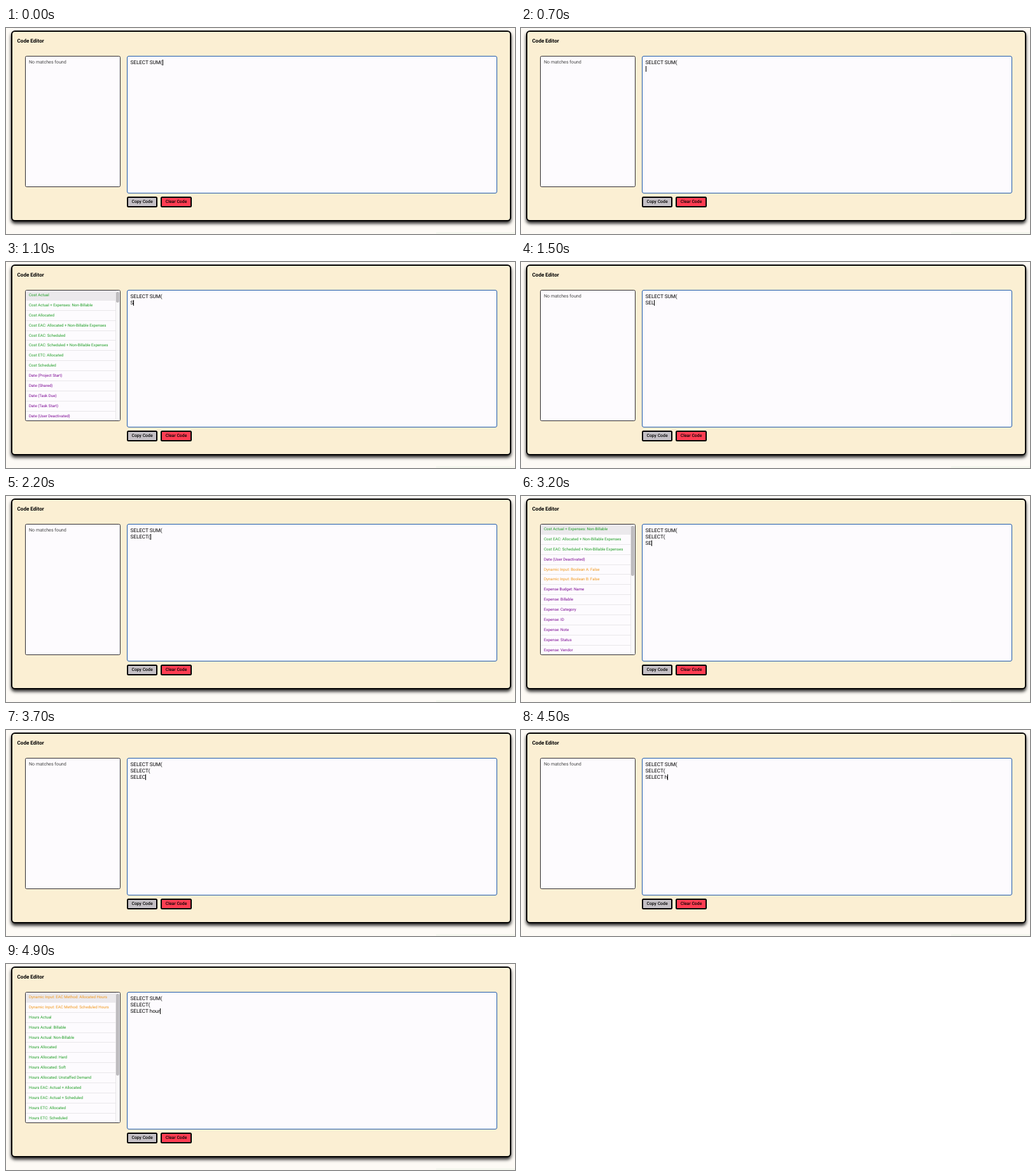
Write an HTML page that moves like this. It is 800 px wide and 325 px high and loops after 5000 ms.

```html
<!DOCTYPE html>
<html lang="en">
<head>
<meta charset="utf-8">
<title>Code Editor</title>
<style>
  * { box-sizing: border-box; }
  html, body { margin: 0; width: 100%; height: 100%; overflow: hidden; background: #fdfaf5; }
  body { position: relative; font-family: Roboto, sans-serif; color: #000; text-rendering: geometricPrecision; }
  body div { position: absolute; white-space: pre; }
  .card {
    left: 8px; top: 4px; width: 786px; height: 300.5px;
    border: 2px solid #000; border-radius: 6px;
    background: #fbefd3; box-shadow: 0 3.5px 5px rgba(0, 0, 0, .85);
  }
  .tint { left: 676px; top: 322px; width: 124px; height: 3px; background: #f5f7ee; }
  .title { left: 17.5px; top: 14px; line-height: 12px; font-size: 8.1px; font-weight: 700; }
  .panel {
    left: 30px; top: 44px; width: 150px; height: 207px; overflow: hidden;
    border: 1px solid #2e2c30; border-radius: 2.5px; background: #fdfbfe;
  }
  .empty { left: 5px; top: 3.5px; font-size: 7.15px; line-height: 10px; color: #444; }
  .list { inset: 0; }
  .list .row {
    left: 0; width: 141px; height: 15.88px; padding-left: 5px;
    font-size: 6.15px; line-height: 15.6px; border-bottom: .8px solid #e9e7ea;
  }
  .list .row:first-child { background: #ebe9ec; }
  .track { right: 0; top: 0; width: 7.5px; height: 100%; background: #faf9fa; border-left: 1px solid #e8e6e8; }
  .thumb { left: .8px; top: 2px; width: 4.6px; border-radius: 2.3px; background: #bdbbbe; }
  .code {
    left: 189.5px; top: 44.3px; width: 582px; height: 217px;
    border: 1.5px solid #1c58a8; border-radius: 3px; background: #fdfbfe;
  }
  .text { left: 195.5px; top: 50.3px; font-size: 8.1px; line-height: 9.75px; }
  .text i { display: inline-block; width: .8px; height: 9px; margin-right: -1px; vertical-align: -2px; background: #000; }
  .btn {
    top: 266px; height: 17.2px; border: 2px solid #000; border-radius: 2.5px;
    font-size: 6.85px; font-weight: 500; line-height: 13.2px; text-align: center;
  }
  .copy { left: 190px; width: 48px; background: #c4c0c5; }
  .clear { left: 243px; width: 49px; background: #ff3d52; }
</style>
</head>
<body>
<div class="tint"></div>
<div class="card"></div>
<div class="title">Code Editor</div>
<div class="panel" id="panel"><div class="empty" id="empty">No matches found</div></div>
<div class="code"></div>
<div class="text"><span id="typed"></span><i></i></div>
<div class="btn copy">Copy Code</div>
<div class="btn clear">Clear Code</div>
<script>
const LOOP = 5000, ROW = 15.88;
const GREEN = '#209f26', PURPLE = '#7d0894', ORANGE = '#f0961a';
const colorOf = s => /^(Cost|Hours)/.test(s) ? GREEN : /^Dynamic/.test(s) ? ORANGE : PURPLE;

const lists = {
  s: [17, `Cost Actual|Cost Actual + Expenses: Non-Billable|Cost Allocated|Cost EAC: Allocated + Non-Billable Expenses|Cost EAC: Scheduled|Cost EAC: Scheduled + Non-Billable Expenses|Cost ETC: Allocated|Cost Scheduled|Date (Project Start)|Date (Shared)|Date (Task Due)|Date (Task Start)|Date (User Deactivated)`],
  se: [79, `Cost Actual + Expenses: Non-Billable|Cost EAC: Allocated + Non-Billable Expenses|Cost EAC: Scheduled + Non-Billable Expenses|Date (User Deactivated)|Dynamic Input: Boolean A: False|Dynamic Input: Boolean B: False|Expense Budget: Name|Expense: Billable|Expense: Category|Expense: ID|Expense: Note|Expense: Status|Expense: Vendor`],
  hour: [129, `Dynamic Input: EAC Method: Allocated Hours|Dynamic Input: EAC Method: Scheduled Hours|Hours Actual|Hours Actual: Billable|Hours Actual: Non-Billable|Hours Allocated|Hours Allocated: Hard|Hours Allocated: Soft|Hours Allocated: Unstaffed Demand|Hours EAC: Actual + Allocated|Hours EAC: Actual + Scheduled|Hours ETC: Allocated|Hours ETC: Scheduled`]
};

// [time of key press, key]
const keys = [
  [500, '\n'], [1000, 'S'], [1200, 'E'], [1400, 'L'], [1600, 'E'], [1700, 'C'], [1800, 'T'], [2200, '('],
  [2500, '\n'], [2900, 'S'], [3100, 'E'], [3300, 'L'], [3500, 'E'], [3700, 'C'], [3800, 'T'], [4200, ' '],
  [4500, 'h'], [4600, 'o'], [4700, 'u'], [4800, 'r']
];
// [time the matches refresh, list]
const matches = [[0, ''], [1100, 's'], [1300, 'se'], [1500, ''], [3000, 's'], [3200, 'se'], [3400, ''], [4600, 'hour']];

const $ = id => document.getElementById(id);
const add = (parent, cls) => {
  const el = document.createElement('div');
  el.className = cls;
  return parent.appendChild(el);
};

const views = {};
for (const [name, [thumb, items]] of Object.entries(lists)) {
  const list = views[name] = add($('panel'), 'list');
  items.split('|').forEach((item, i) => {
    const row = add(list, 'row');
    row.textContent = item;
    row.style.top = i * ROW + 'px';
    row.style.color = colorOf(item);
  });
  add(add(list, 'track'), 'thumb').style.height = thumb + 'px';
}

function draw() {
  const t = performance.now() % LOOP;
  const text = 'SELECT SUM(' + keys.filter(k => k[0] <= t).map(k => k[1]).join('');
  if ($('typed').textContent !== text) $('typed').textContent = text;
  const current = matches.filter(m => m[0] <= t).pop()[1];
  $('empty').hidden = current !== '';
  for (const name in views) views[name].hidden = name !== current;
  requestAnimationFrame(draw);
}
draw();
</script>
</body>
</html>
```
